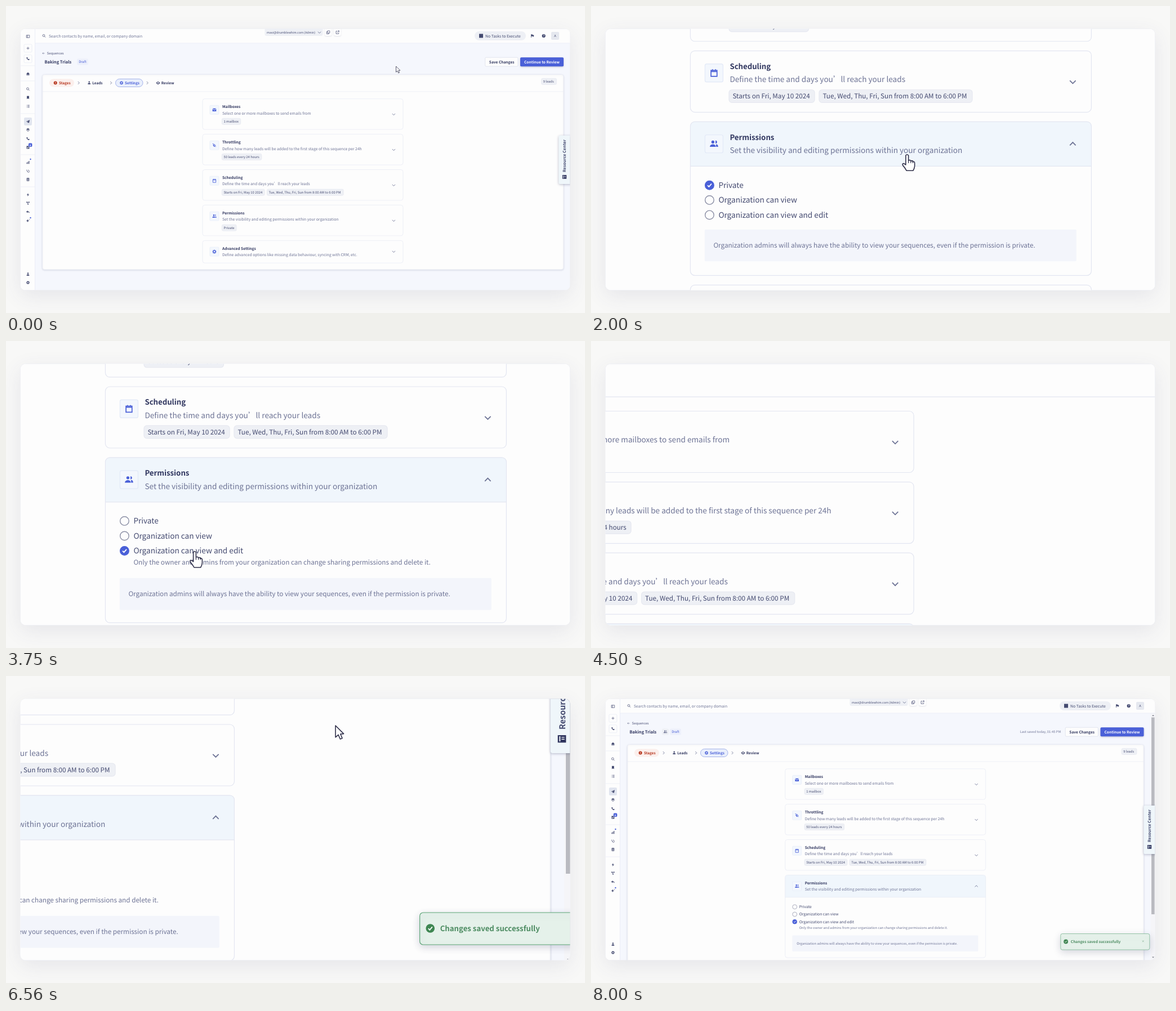
These frames come from a looping animation (1028 by 545 pixels, 8.06 s). An HTML page with a canvas:

```html
<!DOCTYPE html>
<html lang="en">
<head>
<meta charset="utf-8">
<title>Sequence settings</title>
<style>
  html, body { margin: 0; width: 100%; height: 100%; overflow: hidden; background: #f8f8f7; }
  canvas { display: block; }
</style>
</head>
<body>
<canvas id="stage" width="1028" height="545"></canvas>
<script>
const ctx = document.getElementById('stage').getContext('2d');
const LOOP = 8060;
const FONT = '"Noto Sans CJK SC", "Noto Sans CJK JP", "Noto Sans", sans-serif';
const BLUE = '#4a60d8', NAVY = '#30365f', INK = '#444a70', MUTED = '#6d7395',
      LINE = '#e3e6f1', PAGE = '#f5f7fd', CHIP = '#eef0f5', WHITE = '#fdfdfd';

// ---------- timing ----------
const clamp = v => Math.max(0, Math.min(1, v));
const span = (t, start, length) => clamp((t - start) / length);
const inOut = p => p < .5 ? 4 * p ** 3 : 1 - 4 * (1 - p) ** 3;
const mix = (a, b, p) => a + (b - a) * p;
const follow = (t, from, moves) => moves.reduce((now, [start, length, ...to]) =>
  now.map((v, i) => mix(v, to[i], inOut(span(t, start, length)))), from);

// start, duration, then scale and offset
const CAMERA = [
  [430, 900, 2, -513, -507], [1500, 800, 2, -513, -500], [4000, 900, 2, -997, -47],
  [5700, 800, 2, -996, -495], [7150, 800, 1, 0, 0]
];
// start, duration, then position
const POINTER = [
  [60, 800, 562, 338.5], [1050, 400, 548, 372], [1750, 700, 489, 431], [2600, 400, 424, 437],
  [4450, 750, 870, 100], [5380, 300, 818.5, 204.5], [5900, 600, 790.5, 291.5], [6900, 500, 640, 530]
];
const OPEN_AT = 1560, PICK_AT = 3060, SAVE_AT = 5230, SAVED_AT = 6390;

// ---------- drawing helpers ----------
function box(x, y, w, h, fill, stroke, r = 2) {
  ctx.beginPath();
  ctx.roundRect(x, y, w, h, r);
  if (fill) { ctx.fillStyle = fill; ctx.fill(); }
  if (stroke) { ctx.strokeStyle = stroke; ctx.lineWidth = .6; ctx.stroke(); }
}
function shadowed(blur, dy, color, draw) {
  ctx.save();
  ctx.shadowBlur = blur; ctx.shadowOffsetY = dy; ctx.shadowColor = color;
  draw();
  ctx.restore();
}
// Type is set ten times larger and scaled down, which keeps fractional advances.
function text(str, x, y, size = 6.8, color = MUTED, weight = 400, align = 'left') {
  ctx.save();
  ctx.translate(x, y);
  ctx.scale(.1, .1);
  ctx.font = `${weight} ${size * 10}px ${FONT}`;
  ctx.textAlign = align;
  ctx.fillStyle = color;
  ctx.fillText(str, 0, 0);
  const width = ctx.measureText(str).width / 10;
  ctx.restore();
  return width;
}
function line(color, width, ...points) {
  ctx.beginPath();
  points.forEach(([x, y]) => ctx.lineTo(x, y));
  ctx.strokeStyle = color; ctx.lineWidth = width;
  ctx.stroke();
}
function dot(x, y, r, fill, stroke) {
  ctx.beginPath();
  ctx.arc(x, y, r, 0, 7);
  if (fill) { ctx.fillStyle = fill; ctx.fill(); }
  if (stroke) { ctx.strokeStyle = stroke; ctx.lineWidth = .7; ctx.stroke(); }
}
function chip(str, x, y, width) {
  box(x, y, width, 11.3, CHIP, '#e6e8f0', 2.5);
  text(str, x + 3.2, y + 7.8, 5.85, INK);
}
const chevron = (x, y, d = 1, color = MUTED) =>
  line(color, .9, [x - 2.6, y - 1.3 * d], [x, y + 1.3 * d], [x + 2.6, y - 1.3 * d]);
const arrowRight = (x, y) => line(MUTED, .9, [x - 1.2, y - 2.4], [x + 1.2, y], [x - 1.2, y + 2.4]);
const tick = (x, y) => line('#fff', .9, [x - 1.7, y + .1], [x - .5, y + 1.4], [x + 1.8, y - 1.3]);

// ---------- icons on a 24 unit grid ----------
const gearOutline = 'M' + Array.from({ length: 32 }, (_, i) => {
  const r = i % 4 < 2 ? 11 : 8, a = i * Math.PI / 16;
  return `${12 + r * Math.cos(a)} ${12 + r * Math.sin(a)}`;
}).join('L') + 'z';
const FILLED = {
  mail: 'M2 4h20l-10 8zM2 7l10 8 10-8v13H2z',
  bucket: 'M4 12l7-8 9 9-8 8zM8 12h8l-4-5zM2 3l2-2 18 19-2 2zM20 16c5 6-3 8-2 3z',
  users: 'M9 11a4 4 0 1 0 0-8 4 4 0 0 0 0 8zM1 20c0-9 16-9 16 0zM16 11a4 4 0 0 0 0-8zM18 20h5c0-5-2-7-6-7z',
  user: 'M12 11a4.500 4.500 0 1 0 0-9 4.500 4.500 0 0 0 0 9zM3 22c0-12 18-12 18 0z',
  gear: gearOutline + 'M12 8a4 4 0 1 0 0 8 4 4 0 0 0 0-8z',
  phone: 'M3 4l5-2 3 6-3 2q2 4 6 6l2-3 6 3-2 5C11 23 2 13 3 4z',
  home: 'M1 12L12 2l11 10h-3v10h-6v-7h-4v7H4V12z',
  bookmark: 'M5 2h14v20l-7-5-7 5z',
  send: 'M1 12L23 2l-4 20-7-4-3 4v-6l9-9-12 8z',
  layers: 'M12 1l11 6-11 6L1 7zM1 11l11 6 11-6v3l-11 6L1 14zM1 17l11 6 11-6-11 5z',
  tasks: 'M3 3h18v18H3zM7 11l-2 2 5 5 9-10-2-2-7 8z',
  bars: 'M3 13h4v9H3zM10 8h4v14h-4zM17 3h4v19h-4z',
  card: 'M4 2h16v20H4zM12 6a3 3 0 1 0 0 6 3 3 0 0 0 0-6zM7 18h10c0-6-10-6-10 0z',
  bolt: 'M14 1L4 14h7l-2 9 11-13h-8z',
  nodes: 'M2 3h7v6H2zM15 3h7v6h-7zM9 15h7v6H9zM9 5h6v2H9zM6 9l5 6 2-1-5-6z',
  reply: 'M10 3L1 11l9 8v-5c7 0 10 2 12 7 1-9-4-13-12-13z',
  sparkle: 'M10 3l3 7 7 3-7 3-3 7-3-7-7-3 7-3zM20 1l1 3 3 1-3 1-1 3-1-3-3-1 3-1z',
  flag: 'M3 2h3v1h8l1 3h7v11h-9l-1-3H6v9H3z',
  eye: 'M0 12q12-18 24 0-12 18-24 0zM12 7a5 5 0 1 0 0 10 5 5 0 0 0 0-10zM12 10a2 2 0 1 0 0 4 2 2 0 0 0 0-4z',
  book: 'M1 2h22v20H1zM5 5v14h3V5zM11 7v2h8V7zM11 12v2h8v-2z'
};
const STROKED = {
  calendar: 'M4 5h16v16H4zM4 8h16M8 2v4M16 2v4',
  sidebar: 'M2 4h20v16H2zM9 4v16',
  plus: 'M12 3v18M3 12h18',
  search: 'M10 3a7 7 0 1 0 0 14 7 7 0 0 0 0-14zM15 15l7 7',
  list: 'M8 5h14M8 12h14M8 19h14M2 5h2M2 12h2M2 19h2',
  scope: 'M4 3v5c0 8 11 8 11 0V3M9 14c0 10 12 9 12 0M21 9v4',
  copy: 'M8 2h14v14H8zM16 16v6H2V8h6',
  external: 'M10 4H3v17h17v-7M14 2h8v8M22 2L10 14',
  back: 'M22 12H3M10 5l-7 7 7 7',
  cross: 'M4 4l16 16M20 4L4 20'
};
const paths = {};
for (const [name, d] of Object.entries({ ...FILLED, ...STROKED })) paths[name] = new Path2D(d);
function icon(name, x, y, size = 7, color = INK) {
  ctx.save();
  ctx.translate(x - size / 2, y - size / 2);
  ctx.scale(size / 24, size / 24);
  if (name in FILLED) { ctx.fillStyle = color; ctx.fill(paths[name], 'evenodd'); }
  else { ctx.strokeStyle = color; ctx.lineWidth = 2.6; ctx.stroke(paths[name]); }
  ctx.restore();
}

// ---------- interface ----------
const SIDE = [
  [54, 'sidebar'], [75, 'plus'], [93.5, 'phone'], [120.5, 'home'], [147.5, 'search'], [162.5, 'bookmark'],
  [178, 'list'], [205, 'send'], [220, 'layers'], [235.5, 'phone'], [251, 'tasks'], [277.5, 'bars'],
  [293, 'scope'], [308, 'card'], [335, 'bolt'], [350, 'nodes'], [365.5, 'reply'], [381, 'sparkle'],
  [476, 'user'], [491, 'gear']
];
const CARDS = [
  ['mail', 'Mailboxes', 'Select one or more mailboxes to send emails from', ['1 mailbox', 33.5]],
  ['bucket', 'Throttling', 'Define how many leads will be added to the first stage of this sequence per 24h',
    ['50 leads every 24 hours', 70.7]],
  ['calendar', 'Scheduling', 'Define the time and days you’ll reach your leads',
    ['Starts on Fri, May 10 2024', 76], ['Tue, Wed, Thu, Fri, Sun from 8:00 AM to 6:00 PM', 136]],
  ['users', 'Permissions', 'Set the visibility and editing permissions within your organization', ['Private', 26]],
  ['gear', 'Advanced Settings', 'Define advanced options like missing data behaviour, syncing with CRM, etc.']
];
const OPTIONS = ['Private', 'Organization can view', 'Organization can view and edit'];

function sidebar() {
  box(26, 41, 25.5, 463, WHITE, null, 0);
  line(LINE, .6, [51.5, 41], [51.5, 504]);
  for (const y of [106, 133, 191, 264, 321]) line(LINE, .6, [26, y], [51.5, y]);
  for (const y of [75, 93.8]) box(32, y - 7, 14, 14, WHITE, LINE);
  box(32, 198, 14, 14, '#e1e5ef');
  for (const [y, name] of SIDE) icon(name, 39, y, 6.6);
  box(40, 243.5, 6.4, 6.4, BLUE, null, 1.6);
  text('6', 43.2, 248.6, 4.6, '#fff', 600, 'center');
  dot(43.5, 272, 1.2, BLUE);
  dot(43.5, 376, 1.2, BLUE);
}

function topBar() {
  box(51.5, 41, 950, 25, WHITE, null, 0);
  line(LINE, .6, [51.5, 66], [1001, 66]);
  icon('search', 67.5, 53, 6.5);
  text('Search contacts by name, email, or company domain', 76, 55.6, 6.76);
  box(459.500, 36, 103, 17, CHIP, null, 3);
  text('mavi@drumblewhim.com (Admin)', 463, 48.7, 5.35, INK);
  chevron(556.5, 47);
  for (const [x, name] of [[572, 'copy'], [588.5, 'external']]) {
    shadowed(2, 1, '#30365f22', () => box(x - 6.5, 36, 13, 17, WHITE, null, 3));
    icon(name, x, 46.8, 6.6);
  }
  box(832, 45, 91, 16, CHIP, null, 8);
  box(840, 49.6, 7, 7, INK, null, 0);
  text('No Tasks to Execute', 851, 55.6, 6.85, INK, 500);
  icon('flag', 934.5, 53, 6.5);
  dot(954.7, 53, 3.1, INK);
  text('?', 954.7, 55, 5, '#fff', 700, 'center');
  box(968, 46, 14, 14, '#e5e8ef');
  text('A', 975, 55.2, 5.6, INK, 500, 'center');
}

function heading(right, saving, saved) {
  icon('back', 66.6, 84, 4.8);
  text('Sequences', 72.8, 86.2, 5.9, INK, 500);
  text('Baking Trials', 68.5, 102, 7.5, NAVY, 700);
  const draft = saved ? 140 : 126;
  if (saved) {
    box(126, 93.5, 12, 11.3, CHIP);
    icon('users', 132, 99, 7, MUTED);
  }
  box(draft, 93.5, 20, 11.3, '#edf0fb');
  text('Draft', draft + 10, 101.3, 5.9, BLUE, 500, 'center');

  const left = right - (saving ? 149.5 : 139.3), width = saving ? 69 : 58.3;
  box(left, 91.2, width, 16, saving ? '#f6f6f9' : WHITE, '#d3d7e4');
  text('Save Changes', right - 87.5, 101.7, 6.6, saving ? '#9296ab' : NAVY, 600, 'right');
  if (saving) {
    const a = saving / 110;
    ctx.beginPath();
    ctx.arc(left + 10, 99.2, 2.4, a, a + 1.5);
    ctx.strokeStyle = MUTED; ctx.lineWidth = .9;
    ctx.stroke();
  }
  if (saved) text('Last saved today, 01:45 PM', left - 8, 101.2, 5.85, MUTED, 400, 'right');
  shadowed(3, 1, '#30365f44', () => box(right - 77, 91.2, 77, 16, BLUE));
  text('Continue to Review', right - 38.5, 101.7, 6.6, '#fff', 600, 'center');
}

function panelHeader(right) {
  line(LINE, .6, [64.5, 152], [right, 152]);
  box(77, 129.5, 44, 14, '#fbefec', null, 7);
  dot(87.7, 136.5, 3, '#b7371f');
  line('#fff', .8, [87.7, 134.8], [87.7, 138]);
  text('Stages', 94, 139, 6.4, '#b7371f', 600);
  icon('user', 147.7, 136.3, 6.5);
  text('Leads', 153.2, 139, 6.4, NAVY, 600);
  box(194.5, 129.5, 48.5, 14, '#e9effc', '#7389dd', 7);
  icon('gear', 205, 136.5, 7, BLUE);
  text('Settings', 211, 139, 6.4, BLUE, 600);
  icon('eye', 270, 136.5, 7);
  text('Review', 275.7, 139, 6.4, NAVY, 600);
  for (const x of [129, 186.5, 251]) arrowRight(x, 136.5);
  chip('9 leads', right - 39.5, 128.3, 27);
}

function permissionBody(x, top, bottom, picked) {
  ctx.save();
  ctx.beginPath();
  ctx.rect(x, top + 39.500, 356, bottom - top - 39.500);
  ctx.clip();
  OPTIONS.forEach((label, i) => {
    const y = top + 56.4 + i * 13.2, on = i === (picked ? 2 : 0);
    dot(x + 17, y, 3.9, on ? BLUE : WHITE, on ? BLUE : '#8b8fa5');
    if (on) tick(x + 17, y);
    text(label, x + 25, y + 2.4, 6.8, INK);
  });
  if (picked) text('Only the owner and admins from your organization can change sharing permissions and delete it.',
    x + 25, top + 95.2, 5.85);
  const y = top + (picked ? 107 : 95.7);
  box(x + 12.700, y, 330, 28.3, '#f3f5fb', null, 1);
  text('Organization admins will always have the ability to view your sequences, even if the permission is private.',
    x + 20.5, y + 16.2, 5.85);
  ctx.restore();
}

function card(index, x, top, height, state) {
  const [name, title, about, ...chips] = CARDS[index];
  const open = index === 3 && state.open > 0;
  const head = open ? 39.5 : height;
  const hover = state.px > x && state.px < x + 356 && state.py > top && state.py < top + head;
  if (hover) state.hand = true;
  box(x, top, 356, height, WHITE, null, 4);
  if (hover || open) box(x, top, 356, head, '#f0f6fc', null, open ? [4, 4, 0, 0] : 4);
  box(x, top, 356, height, null, LINE, 4);
  if (open) line(LINE, .6, [x, top + head], [x + 356, top + head]);
  box(x + 13, top + 11.7, 16, 16, '#f3f7fd', '#e2e9f7', 1.5);
  icon(name, x + 21, top + 19.7, 8, BLUE);
  text(title, x + 35, top + 16.2, 6.6, NAVY, 600);
  text(about, x + 35, top + 27.9);
  if (open) permissionBody(x, top, top + height, state.picked);
  else chips.reduce((left, [label, width]) => {
    chip(label, left, top + 34.6, width);
    return left + width + 4;
  }, x + 34.3);
  chevron(x + 339.5, top + (open || index === 4 ? 19.7 : 27.7), open ? -1 : 1);
}

function scrollbar() {
  box(993.5, 66.3, 8, 438, '#f5f5f8', null, 0);
  box(995, 73.5, 5.6, 349.5, '#b9bac0', null, 0);
  for (const [y, d] of [[70, -1], [499.5, 1]]) {
    ctx.beginPath();
    ctx.moveTo(996, y - d); ctx.lineTo(1000, y - d); ctx.lineTo(998, y + d);
    ctx.fillStyle = '#777a85';
    ctx.fill();
  }
}

function resourceTab() {
  shadowed(4, 1, '#30365f55', () => box(981.3, 230, 24, 86, '#eff6fa', null, 2));
  ctx.save();
  ctx.translate(994.4, 295);
  ctx.rotate(-Math.PI / 2);
  text('Resource Center', 0, 0, 7.2, INK, 600);
  ctx.restore();
  icon('book', 991.5, 303.3, 8, NAVY);
}

function toast(t) {
  const x = 833.8 + 168 * (1 - span(t, SAVED_AT, 400)) ** 3;
  shadowed(14, 4, '#30365f33', () => box(x, 457.5, 158, 28.5, '#e5f1ea', '#5da677', 3));
  dot(x + 9.3, 471.5, 3.9, '#3f8652');
  tick(x + 9.3, 471.5);
  text('Changes saved successfully', x + 18, 474, 6.6, '#4d8c62', 600);
  icon('cross', x + 146.4, 470.8, 4.5, '#6a9d7b');
}

const ARROW = new Path2D('M0 0V10.400L2.500 8.200 4.200 12 6 11.200 4.400 7.500 7.300 7.300z');
const HAND = new Path2D('M-1.200.5Q0-1 1.200.5V5Q2.700 4 3.300 5.500 4.700 4.600 5.100 6.100 6.700 5.500 6.700 7.500V10Q6.500 12 5.300 14H-.500Q-1.700 11.700-3.800 9.300C-4.700 7.500-3 7-1.200 8.800z');
function pointer({ px, py, hand }) {
  ctx.save();
  ctx.translate(px, py);
  ctx.fillStyle = '#fff'; ctx.strokeStyle = '#30304a'; ctx.lineWidth = .8; ctx.lineJoin = 'round';
  const shape = hand ? HAND : ARROW;
  ctx.fill(shape);
  ctx.stroke(shape);
  if (hand) for (const x of [1.2, 3.3, 5.1]) line('#30304a', .6, [x, 5], [x, 7.3]);
  ctx.restore();
}

function app(t) {
  const [px, py] = follow(t, [692.5, 107], POINTER);
  const open = inOut(span(t, OPEN_AT, 200)), picked = t >= PICK_AT, saved = t >= SAVED_AT;
  const state = { px, py, open, picked, hand: false };
  const right = open ? 981.5 : 990, x = (64.5 + right) / 2 - 178.3;
  const grown = open ? mix(54.5, picked ? 146.7 : 136.5, open) : 54.5;

  box(26, 41, 975, 463, PAGE, null, 0);
  heading(right, t >= SAVE_AT && !saved ? t - SAVE_AT : 0, saved);
  shadowed(3, 1, '#30365f22', () => box(64.5, 121.5, right - 64.5, 292 + grown, WHITE, LINE, 4));
  panelHeader(right);
  CARDS.forEach((_, i) => card(i, x, i < 4 ? 164.7 + i * 62.9 : 361.900 + grown,
    i === 3 ? grown : i === 4 ? 39.800 : 54.500, state));
  if (open) scrollbar();
  topBar();
  sidebar();
  if (saved) toast(t);
  resourceTab();

  const onButton = px > right - 139 && px < right && py > 91 && py < 107;
  const onOption = open && px > x + 12 && px < x + 125 && py > 403 && py < 442;
  state.hand = state.hand || onButton || onOption;
  pointer(state);
}

function frame(now) {
  const t = now % LOOP, [scale, dx, dy] = follow(t, [1, 0, 0], CAMERA);
  ctx.textRendering = 'geometricPrecision';
  ctx.fillStyle = '#f8f8f7';
  ctx.fillRect(0, 0, 1028, 545);
  shadowed(36, 10, 'rgba(70,70,120,.1)', () => box(25.500, 40.500, 976, 464, PAGE, '#eeeef2', 9));
  ctx.save();
  ctx.beginPath();
  ctx.roundRect(25.5, 40.5, 976, 464, 9);
  ctx.clip();
  ctx.translate(dx, dy);
  ctx.scale(scale, scale);
  app(t);
  ctx.restore();
  requestAnimationFrame(frame);
}
const began = performance.now();
requestAnimationFrame(() => frame(0));
const request = window.requestAnimationFrame.bind(window);
window.requestAnimationFrame = draw => request(now => draw(Math.max(0, now - began)));
</script>
</body>
</html>
```
